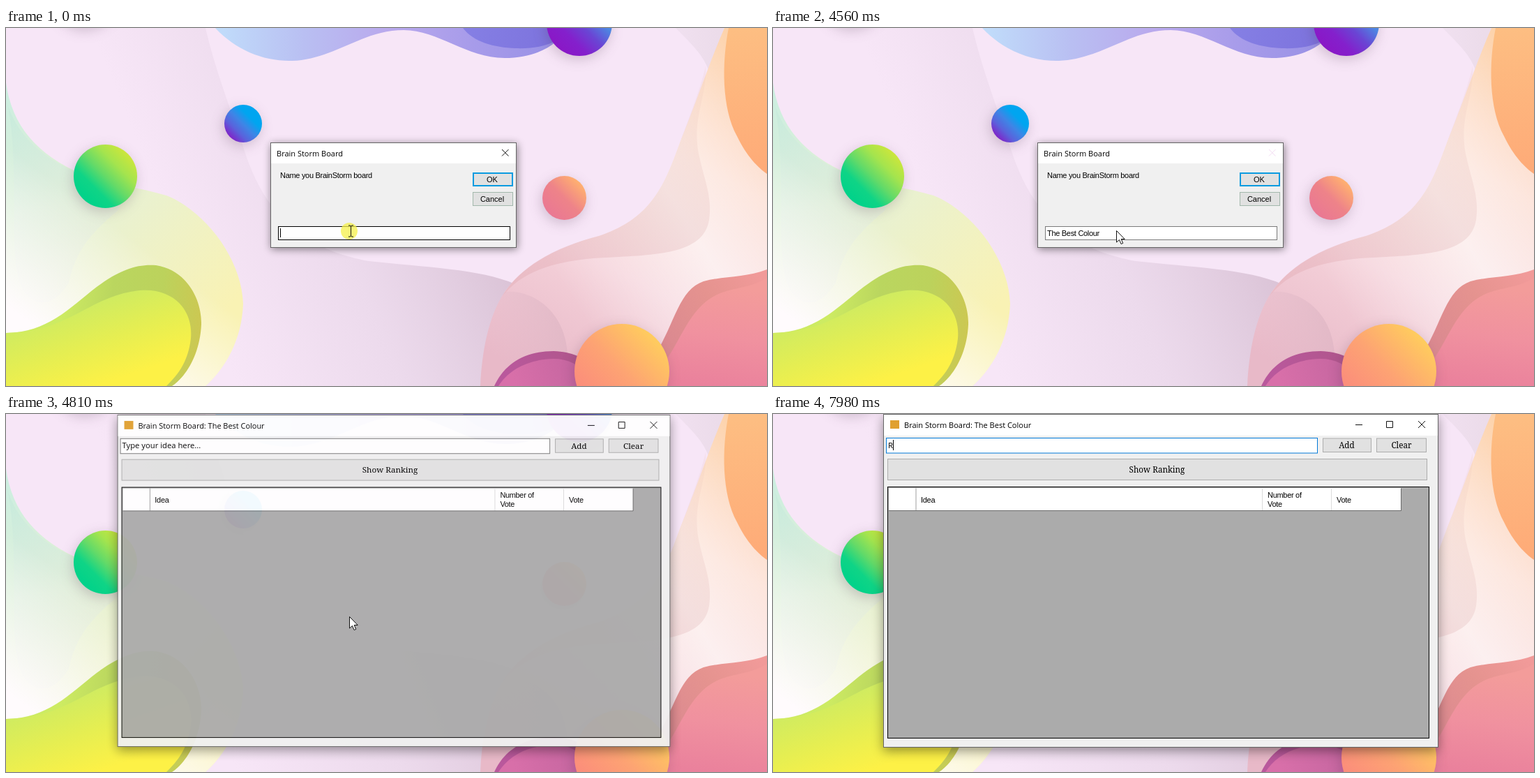
These frames come from a looping animation (1091x513 px, 8000 ms). An HTML page:

```html
<!DOCTYPE html>
<html lang="en">
<head>
<meta charset="utf-8">
<title>Brain Storm Board</title>
<style>
html, body { margin: 0; width: 100%; height: 100%; overflow: hidden; background: #f7e6f7; }
svg { display: block; }
text { white-space: pre; fill: #000; }
.ui { font: 11px "Open Sans", sans-serif; }
.form { font: 11px "Liberation Sans", Arial, sans-serif; letter-spacing: -.3px; }
.idea { font: 11.3px "Open Sans", sans-serif; }
.slab { font: 500 11.7px "Noto Serif", serif; text-anchor: middle; }
.mid { text-anchor: middle; letter-spacing: 0; }
.btn { fill: #e1e1e1; stroke: #adadad; }
.field { fill: #fff; stroke: #7a7a7a; }
.line { fill: none; stroke: #111; }
.ball { filter: drop-shadow(-2px 5px 9px #5030503a); }
.frame { fill: #f0f0f0; stroke: #666; }
#dlg .frame { filter: drop-shadow(1px 2px 6px #0007); }
#win .frame { filter: drop-shadow(0 5px 8px #0006); }
#dlg, #win { transform-origin: 555.5px 239px; }
</style>
</head>
<body>
<svg width="1091" height="513" viewBox="0 0 1091 513">
  <g id="bg"></g>

  <g id="win">
    <rect class="frame" x="158.5" y=".5" width="795" height="477"/>
    <rect x="159" y="1" width="794" height="30" fill="#fff"/>
    <rect x="168" y="9" width="13" height="12" fill="#e0a030"/>
    <text class="ui" x="188" y="20">Brain Storm Board: The Best Colour</text>
    <path class="line" d="M835 15.5h10M879.5 10.5h9v9h-9zM925 10l10 10m0-10l-10 10"/>
    <rect id="ideaBox" class="field" x="162.5" y="34.5" width="618" height="21.5"/>
    <text id="idea" class="idea" x="165" y="48.5"></text>
    <rect id="ideaCaret" y="37" width="1" height="15"/>
    <rect class="btn" x="788.5" y="35" width="69" height="19.5"/>
    <rect class="btn" x="865.5" y="35" width="71" height="19.5"/>
    <rect class="btn" x="164.5" y="64.5" width="773" height="30"/>
    <text class="slab" x="822.5" y="49">Add</text>
    <text class="slab" x="901" y="49">Clear</text>
    <text class="slab" x="550.5" y="83.5">Show Ranking</text>
    <rect x="164.5" y="104.5" width="776" height="360" fill="#ababab" stroke="#000"/>
    <rect x="166" y="106" width="734" height="32" fill="#fff"/>
    <path class="line" d="M205 106v32M166 138.5h734.5v-32" stroke-opacity=".4"/>
    <path class="line" d="M701.5 107v31M800.5 107v31" stroke-opacity=".15"/>
    <g class="form">
      <text x="212" y="127">Idea</text>
      <text x="709" y="120">Number of</text>
      <text x="709" y="132.5">Vote</text>
      <text x="808" y="127">Vote</text>
    </g>
  </g>

  <g id="dlg">
    <rect class="frame" x="379.5" y="164.5" width="352" height="150"/>
    <rect x="380" y="165" width="351" height="29" fill="#fff"/>
    <text class="ui" x="388" y="184">Brain Storm Board</text>
    <path id="close" class="line" d="M711 174l9.5 9.5m0-9.5l-9.5 9.5"/>
    <rect class="btn" x="670" y="208" width="56" height="18" style="stroke:#0a9be0;stroke-width:2"/>
    <rect class="btn" x="669.5" y="235.5" width="57" height="19" style="stroke:#a3b8ac"/>
    <rect id="nameBox" class="field" x="390.5" y="284.5" width="332" height="19"/>
    <g class="form">
      <text x="393" y="215">Name you BrainStorm board</text>
      <text class="mid" x="697" y="221">OK</text>
      <text class="mid" x="697" y="249">Cancel</text>
      <text id="name" x="393" y="297.5"></text>
    </g>
    <rect id="nameCaret" y="287" width="1" height="13"/>
  </g>

  <circle id="glow" r="12" fill="#f6f04a"/>
  <path id="beam" class="line" d="M-3.5-8h2.5l1 1 1-1h2.5M0-7V7M-3.5 8h2.5l1-1 1 1h2.5"/>
  <path id="arrow" d="M0 0V16.5L4 13l2.6 6 2.6-1.1L6.7 12H11.7Z" fill="#fff" stroke="#111"/>
</svg>
<script>
const $ = id => document.getElementById(id);

// Background: each shape is filled with a linear gradient of evenly spaced stops.
let art = '', count = 0;
function paint(shape, [x1, y1, x2, y2], ...colors) {
  const id = 'g' + count++;
  const stops = colors.map((c, i) =>
    `<stop offset="${i / (colors.length - 1)}" stop-color="${c}"/>`).join('');
  art += `<linearGradient id="${id}" gradientUnits="userSpaceOnUse" x1="${x1}" y1="${y1}" x2="${x2}" y2="${y2}">` +
    `${stops}</linearGradient><${shape} fill="url(#${id})"/>`;
}
const blob = (d, axis, ...colors) => paint(`path d="${d}"`, axis, ...colors);
function ball(x, y, r, ...colors) {
  const k = r * .7;
  paint(`circle class="ball" cx="${x}" cy="${y}" r="${r}"`, [x - k, y + k, x + k, y - k], ...colors);
}

// lilac veils
blob('M120 0H286C300 60 320 110 340 170C370 270 430 318 520 334C600 343 680 345 730 367C790 395 805 440 805 470V513H330Z',
  [225, 256, 635, 88], '#d8c4d800', '#d8c4d858', '#d2b8ccd0');
blob('M960 0C985 25 1000 40 1007 60L1030 0Z', [960, 20, 1020, 20], '#f0e0f0', '#ecdcea');

// mint to yellow on the left
const left = 'M0 78C8 140 45 182 110 210C150 225 190 228 230 240C285 262 338 330 340 395C338 450 312 490 286 513H0Z';
blob(left, [0, 100, 320, 400], '#cdeee0', '#e8f1d2', '#f9f2b4');
blob('M0 100C20 180 5 300 17 355C27 400 65 408 90 365C100 320 120 295 160 262L175 227C90 215 15 170 0 100Z',
  [20, 130, 60, 390], '#c4e8da80', '#dfeae460', '#d8e0d850');
blob(left, [30, 420, 140, 270], '#fffbfd', '#ffffff00');
blob('M0 437C60 436 90 402 130 371C165 345 190 338 215 340C260 347 281 390 280 425C278 468 258 500 238 513H0Z',
  [80, 410, 290, 430], '#cdeb62', '#bad65f', '#bcd25c', '#cfc650');
blob('M0 437C55 436 85 418 120 400C160 379 190 373 215 377C250 384 268 412 265 445C261 480 245 498 230 513H0Z',
  [130, 385, 170, 500], '#cdeb62', '#e5ee52', '#fdf146');

// blue wave at the top
blob('M300 0C330 32 370 48 410 47C470 45 510 3 570 3C620 3 660 43 715 43C745 43 772 34 788 20V0Z',
  [310, 20, 780, 20], '#c0dbfa', '#b9bff2', '#b9a9ed', '#a89cea', '#9a92e6');
blob('M655 0C670 20 700 28 730 29C755 30 772 26 785 20V0Z', [660, 0, 785, 20], '#857fe4', '#7d73dd');

// peach and pink on the right
const right = 'M1030 0C1008 50 988 112 967 162C945 222 928 272 850 298C800 311 745 335 715 378C690 415 682 470 680 513H1091V0Z';
blob(right, [1020, 0, 760, 500], '#fdd2aa', '#fcdcd0', '#f5d2da', '#e8b9c8');
blob(right, [850, 450, 1186, 242], '#ffffff00', '#ffffffa0', '#ffffff00');
blob('M1003 55C1006 95 983 130 993 180C1000 215 1013 240 1008 275C1000 325 930 325 860 329C790 332 740 348 712 384C740 335 800 311 850 298C928 272 945 222 967 162C982 122 995 88 1003 55Z',
  [980, 80, 780, 340], '#e8c0b828', '#e0b8b850', '#e0a8b060');
blob('M715 378C760 375 803 410 805 470L760 513H680C682 470 690 415 715 378Z', [700, 460, 800, 420], '#d9b4c800', '#cfa8b860');
blob('M1036 0C1026 50 1026 115 1048 155C1062 184 1078 200 1091 209V0Z', [1060, 0, 1080, 200], '#fdbe82', '#feab78');
blob('M930 470C960 420 965 375 1000 363C1030 355 1060 358 1091 346V513H930Z', [950, 440, 1080, 350], '#dc8a90', '#e5938f', '#f19a99');
blob('M945 478C965 450 975 418 1000 395C1030 368 1060 378 1091 358V513H940Z', [1030, 370, 1010, 513], '#f39c9a', '#f0919f', '#ea819c');
blob('M700 513C715 480 745 463 785 463C812 464 828 472 840 485V513Z', [720, 500, 820, 470], '#b9589c', '#b0568c');
blob('M706 513C722 488 750 475 785 474C805 474 820 482 835 495V513Z', [730, 510, 820, 480], '#d86fa9', '#c566a0');

ball(115, -46, 45, '#ccc', '#ccc');
ball(822, -7, 47, '#8a17c6', '#8420cc', '#6a45d4', '#4d86e2', '#4d86e2');
ball(340, 137, 27, '#7f25c8', '#5a62dc', '#3d86e6', '#00a5f0', '#00a5f0');
ball(142.5, 212.5, 45.5, '#00d28a', '#0fd486', '#64da68', '#a4e44e', '#cbe63c');
ball(800.5, 243.5, 31.5, '#ea7893', '#ee8389', '#ffb070');
ball(883, 492, 68, '#fb8a7c', '#fda373', '#ffcc5e');
$('bg').innerHTML = art;

const phrase = 'The Best Colour';
// time at which each character appears
const keys = [240, 390, 470, 780, 1080, 1250, 1480, 1560, 1940, 2250, 2710, 3170, 3570, 3800, 3800];
// time, window opacity and scale, dialog opacity and scale
const swap = [
  [0, 0, 1, 1, 1],
  [4650, .47, .971, .42, .972],
  [4730, .8, .986, .12, .955],
  [4810, .95, .996, 0, .94],
  [4880, 1, 1, 0, .94]
];
const HOVER = '#000', IDLE = '#7a7a7a', FOCUS = '#0078d7';

const show = (id, alpha) => $(id).setAttribute('opacity', +alpha);
const place = (id, x, y) => $(id).setAttribute('transform', `translate(${x} ${y})`);
function layer(id, alpha, scale) {
  show(id, alpha);
  $(id).style.transform = scale === 1 ? 'none' : `scale(${scale})`;
}
function type(id, text, caretOn) {
  const el = $(id), caret = $(id + 'Caret');
  if (el.textContent !== text) el.textContent = text;
  caret.setAttribute('x', Math.round(+el.getAttribute('x') + el.getComputedTextLength()));
  show(id + 'Caret', caretOn);
}

function draw(t) {
  const [, winAlpha, winScale, dlgAlpha, dlgScale] = swap.findLast(s => t >= s[0]);
  layer('win', winAlpha, winScale);
  layer('dlg', dlgAlpha, dlgScale);

  type('name', phrase.slice(0, keys.filter(k => t >= k).length), t < 4330);
  $('nameBox').style.stroke = t < 240 ? HOVER : IDLE;
  $('close').style.stroke = t < 4560 ? '#111' : '#f3dcf3';

  // the pointer leaves over the top edge, comes back and clicks
  const step = Math.max(0, Math.floor((t - 6430) / 77));
  const p = Math.min(1, (step + 1) / 6), ease = 1 - (1 - p) ** 2;
  const x = 410 + 36 * ease, y = -14 + 67 * ease;
  const back = t >= 6430 && t < 7980, inField = y > 32;

  const focused = t >= 6970;
  type('idea', t >= 7980 ? 'R' : focused ? '' : 'Type your idea here...', focused && (t < 7510 || t >= 7980));
  $('ideaBox').style.stroke = focused ? FOCUS
    : t >= 6120 && t < 6270 || back && inField ? HOVER : IDLE;

  show('arrow', t >= 4560 && t < 6040 || back && !inField);
  if (back) place('arrow', x, y); else place('arrow', 492.5, 290.5);

  show('beam', t < 240 || t >= 6040 && t < 6120 || back && inField);
  if (t < 240) place('beam', 494.5, 291);
  else if (back) place('beam', x + .5, y);
  else place('beam', 351, 39.5);

  const glow = t < 90 ? .75 : t < 160 ? .35
    : t >= 6892 && t < 7046 ? .75 : t >= 7046 && t < 7200 ? .35 : 0;
  show('glow', glow);
  if (t < 240) place('glow', 492, 291); else place('glow', 445, 53);
}

const start = performance.now();
function tick() {
  draw((performance.now() - start) % 8000);
  requestAnimationFrame(tick);
}
draw(0);
tick();
</script>
</body>
</html>
```
